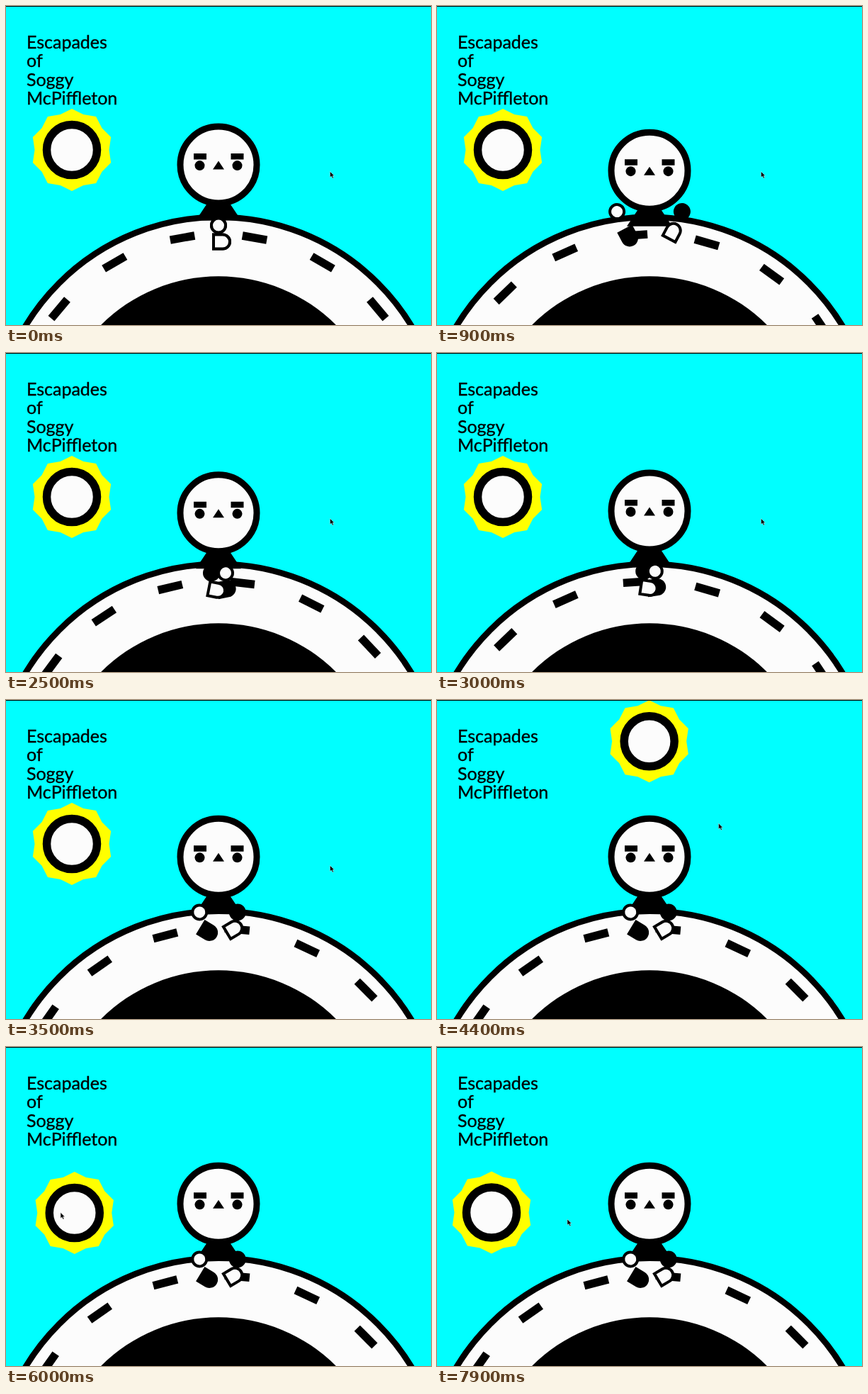
An HTML page that plays this animation: 600x450 px, repeating every 8000 ms.

```html
<!DOCTYPE html>
<html lang="en">
<head>
<meta charset="utf-8">
<title>Planet walk</title>
<style>
html, body { margin: 0; width: 100%; height: 100%; overflow: hidden; background: #0ff; }
svg { display: block; width: 600px; height: 450px; }
text { font: 25px Lato, "Open Sans", sans-serif; stroke: #000; stroke-width: .35; }
.w { fill: #fcfcfc; }
.o { fill: #fcfcfc; stroke: #000; stroke-width: 4; }
</style>
</head>
<body>
<svg viewBox="0 0 600 450">
  <defs>
    <path id="shoe" d="M-7-10H6A10 10 0 0 1 6 10H-7Z" stroke="#000" stroke-width="4"/>
  </defs>
  <rect width="600" height="450" fill="#0ff"/>
  <text x="29" y="60">Escapades</text>
  <text x="29" y="86">of</text>
  <text x="29" y="112.5">Soggy</text>
  <text x="29" y="139">McPiffleton</text>
  <g id="sun">
    <path id="rays" fill="#ff0"/>
    <circle r="35.5" class="w" stroke="#000" stroke-width="11.5"/>
  </g>
  <g transform="translate(300 616)">
    <circle r="318.3" class="w" stroke="#000" stroke-width="8.5"/>
    <circle r="234.7"/>
    <g id="dashes"></g>
  </g>
  <g id="hero">
    <g id="legB"><use href="#shoe" y="35"/></g>
    <g id="armB"><circle cy="52" r="12"/></g>
    <path d="M300 255L332 303H268Z"/>
    <g id="legW"><use href="#shoe" y="35" class="w"/></g>
    <g id="armW"><circle cy="52" r="10" class="o"/></g>
    <circle cx="300" cy="224.5" r="54" class="w" stroke="#000" stroke-width="9"/>
    <path d="M265 208.5h18v8.5h-18zM317.5 208.5h18v8.5h-18zM300 219l8 12h-16z"/>
    <circle cx="273.5" cy="225.5" r="7"/>
    <circle cx="326.5" cy="225.5" r="7"/>
  </g>
  <path d="M0 .5H600" stroke="#000"/>
  <path id="cursor" d="M0 0V8L2 6.5L3.5 9.5L5 9L3.5 6H6Z" stroke="#fff" stroke-width=".4"/>
</svg>
<script>
const $ = id => document.getElementById(id);
const set = (id, value) => $(id).setAttribute('transform', value);
const LOOP = 8000, STEP = 100, WALK = 3500, RAD = Math.PI / 180;

// Where the pointer stops; a click there calls the sun
const stops = [
  { time: 3650, x: 300, y: 58, click: true },
  { time: 4400, x: 397.5, y: 174 },
  { time: 4700, x: 526, y: 245, click: true },
  { time: 5450, x: 77, y: 233.5, click: true },
  { time: 7200, x: 184, y: 243 }
];

const easeOut = p => 1 - (1 - p) ** 3;
const smooth = p => p * p * (3 - 2 * p);

// Position after gliding from (x, y) towards each target in turn
function glide(x, y, targets, t, delay, duration, ease) {
  for (const s of targets) {
    const p = Math.min(1, Math.max(0, (t - s.time - delay) / duration));
    x += (s.x - x) * ease(p);
    y += (s.y - y) * ease(p);
  }
  return [x, y];
}

const rays = Array.from({ length: 20 }, (_, i) => {
  const r = i % 2 ? 52.5 : 58, a = i * 18 * RAD;
  return [r * Math.sin(a), -r * Math.cos(a)];
});
$('rays').setAttribute('d', 'M' + rays.join('L') + 'Z');

for (let a = 10; a < 360; a += 20)
  $('dashes').innerHTML +=
    `<rect x="-17.5" y="-299.2" width="35" height="11.5" transform="rotate(${a})"/>`;

function draw(t) {
  // The walk speeds up a little until it stops
  const w = Math.min(t, WALK), s = w / 1000;
  const turn = -14.5 * s - 1.15 * s * s;
  const f = (180 + 1288 * (w / WALK) ** 1.0975) * RAD;
  const swing = 66 * Math.sin(f);
  const bob = 2.4 - 2.8 * Math.cos(2 * f) - 4.8 * Math.sin(2 * f);
  const limb = (id, y, angle) => set(id, `translate(300 ${y}) rotate(${angle})`);
  set('dashes', `rotate(${turn})`);
  set('hero', `translate(0 ${bob})`);
  limb('legB', 298, swing);
  limb('legW', 298, -swing);
  limb('armB', 258, -swing);
  limb('armW', 258, swing);
  const clicks = stops.filter(s => s.click);
  set('sun', `translate(${glide(93, 203, clicks, t, 0, 850, easeOut)})`);
  set('cursor', `translate(${glide(457.5, 233.5, stops, t, -150, 150, smooth)})`);
}

const begin = performance.now();
function tick() {
  const t = (performance.now() - begin) % LOOP;
  draw(Math.floor(t / STEP) * STEP);
  requestAnimationFrame(tick);
}
tick();
</script>
</body>
</html>
```
